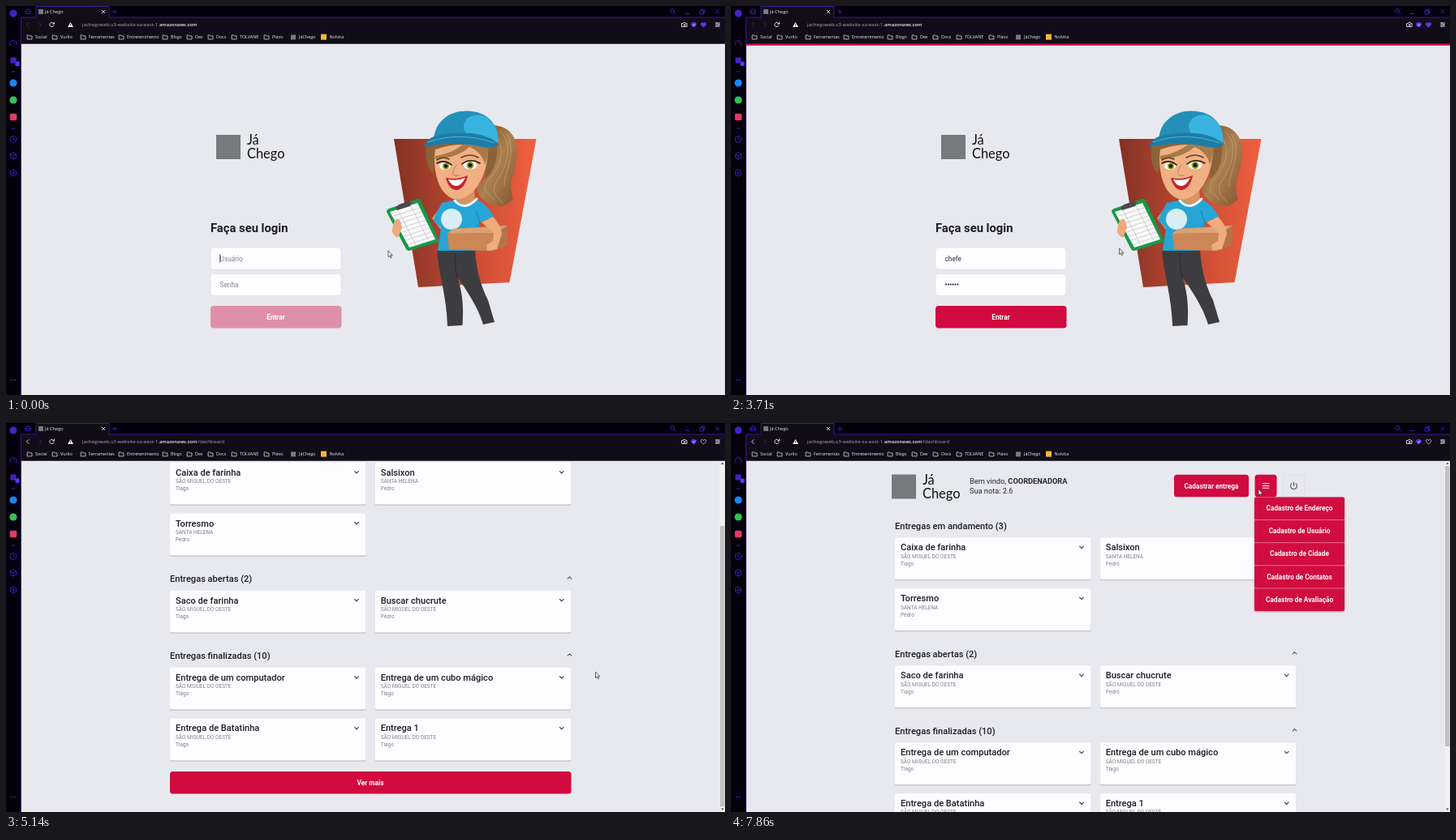
Recreate the animation shown at these times as an HTML page. Size 886 px wide and 480 px high, loop 8 s.

```html
<!DOCTYPE html>
<html lang="pt-BR">
<head>
<meta charset="utf-8">
<style>
html, body { margin: 0; width: 100%; height: 100%; overflow: hidden; background: #e8e9ee }
svg { display: block; width: 886px; height: 480px; font-family: Roboto, sans-serif }
.ui { font-family: "Open Sans", sans-serif; fill: #f2f0f8 }
.b { font-weight: 700 }
.m { font-weight: 500 }
.c { text-anchor: middle; fill: #fff; font-weight: 700; font-size: 8.3px }
.line { fill: none; stroke-linecap: round; stroke-linejoin: round }
</style>
</head>
<body>
<svg viewBox="0 0 886 480">
  <defs>
    <linearGradient id="red"><stop stop-color="#823224"/><stop offset=".55" stop-color="#c94b34"/><stop offset="1" stop-color="#f0603f"/></linearGradient>
    <linearGradient id="hair" x2="1" y2="1"><stop stop-color="#704a2b"/><stop offset=".5" stop-color="#ad8052"/><stop offset="1" stop-color="#80562f"/></linearGradient>
    <filter id="shade" x="-10%" y="-10%" width="120%" height="125%"><feDropShadow dx="0" dy="1" stdDeviation="1" flood-opacity=".35"/></filter>
    <g id="brand">
      <rect x="259" y="159" width="30" height="30" fill="#77797c"/>
      <g font-family="Lato, sans-serif" font-size="16.4" fill="#111"><text x="297" y="171">Já</text><text x="297" y="188">Chego</text></g>
    </g>
  </defs>
  <rect width="886" height="480" fill="#e8e9ee"/>

  <g id="login">
    <use href="#brand"/>
    <text x="252" y="279.2" class="b" font-size="14.77" fill="#1d1d24">Faça seu login</text>
    <g fill="#fdfdff" stroke="#dcdce6" stroke-width=".7">
      <rect x="252" y="298" width="161" height="27.3" rx="4"/>
      <rect x="252" y="330.3" width="161" height="27.3" rx="4"/>
    </g>
    <text id="user" x="263.5" y="314.6" font-size="8.3"/>
    <text id="pass" x="263.5" y="346.9" font-size="8.3"/>
    <g id="dots" fill="#222"></g>
    <rect id="caret" width=".8" height="10.5" fill="#222"/>
    <rect id="enter" x="252" y="370" width="161.5" height="27.5" rx="4"/>
    <text class="c" x="332.5" y="386.6">Entrar</text>

    <g id="courier">
      <path d="M478 164H653.5L620.5 341 508 347Z" fill="url(#red)"/>
      <path d="M600 147C623 148 633 166 629 190C627 210 618 217 625 238C620 241 619 247 608 247C594 245 579 237 580 221C594 214 602 190 597 172Z" fill="url(#hair)"/>
      <path class="line" stroke="#c99d6b" stroke-width=".8" d="M608 154C627 170 617 197 606 214S606 235 612 243M604 160C618 180 606 203 595 214S594 231 602 239M617 158C631 182 613 205 614 222"/>
      <path d="M518 172C516 186 519 200 526 207L532 180 592 178 590 214C604 202 607 184 604 164Z" fill="#8c6238"/>
      <path d="M556 228 577 222 578 243Q567 251 554 243Z" fill="#d99263"/>
      <path d="M529 177C526 196 530 222 543 233C552 241 562 240 572 232C585 222 594 201 594 174Q560 166 529 177Z" fill="#f0b083"/>
      <path d="M529 185C540 184 558 177 566 168L595 172Q594 186 590 196C588 184 579 177 571 174C560 184 544 188 529 189Z" fill="#a97a49"/>
      <g fill="#fff"><ellipse cx="541" cy="197.5" rx="7" ry="4.6"/><ellipse cx="572" cy="196.5" rx="8.5" ry="5"/></g>
      <g fill="#8b9e25"><circle cx="542" cy="197.5" r="4"/><circle cx="572" cy="196.5" r="4.4"/></g>
      <g fill="#151515"><circle cx="542" cy="197.5" r="2.2"/><circle cx="572" cy="196.5" r="2.4"/></g>
      <path class="line" stroke="#28190f" stroke-width="1.6" d="M531 194Q540 189 549 196M562 195Q572 187 584 194"/>
      <path class="line" stroke="#65401f" stroke-width="1.6" d="M531 190Q538 185 546 189M561 187Q572 181 582 187"/>
      <path class="line" stroke="#c77d50" d="M555 196Q548 207 552 209L558 209"/>
      <path d="M542 212Q556 215 569 209C567 220 561 227 555 227C549 227 544 221 542 212Z" fill="#c5232f"/>
      <path d="M545 214Q557 216 566 212Q560 223 554 222Q548 221 545 214Z" fill="#fff"/>
      <path d="M527 166C528 142 547 129 568 129.500C594 130 608 146 606 170Q566 153 527 166Z" fill="#2390b9"/>
      <path d="M564 151C563 138 575 133 587 135C602 141 608 154 606 169Q586 161 568 160Z" fill="#38b3df"/>
      <path d="M516 174C517 163 530 158 550 157C578 155 599 161 607 171Q600 176 588 174Q552 166 516 174Z" fill="#1d7da6"/>
      <path class="line" stroke="#62bfdd" stroke-width=".8" d="M520 168Q559 154 602 169"/>
      <path d="M538 245 525 262 536 276 546 262Z" fill="#eaa473"/>
      <path d="M537 243 555 239Q566 251 578 238C590 243 596 250 601 260L584 267 578 302H532L536 274 526 264Z" fill="#26a6d6"/>
      <path class="line" stroke="#f6f8fa" stroke-width="3" d="M553 240Q565 254 580 238"/>
      <path class="line" stroke="#197da7" d="M579 253 584 267 578 275"/>
      <circle cx="549" cy="263" r="13" fill="#d9edf4"/>
      <path d="M531 302H578C580 329 586 347 594 363L602 390 588 393C581 370 567 350 556 334C563 354 564 374 562.500 394L544 395C543 358 533 329 531 302Z" fill="#3d3d3f"/>
      <path class="line" stroke="#2a2a2c" d="M554 305Q552 324 557 337"/>
      <path d="M544 281 551 275 618 271V295L599 303 546 300Z" fill="#b67349"/>
      <path d="M544 281 551 275 618 271 603 280Z" fill="#dda273"/>
      <path d="M544 281 603 280 600 302 546 300Z" fill="#cc8757"/>
      <path d="M586 267 600 260C607 267 611 275 611 281L605 300 593 302 592 295 600 290 601 280Z" fill="#efac7c"/>
      <path d="M469 254Q469 251 472 250L507 238Q510 237 511 240L533 288Q534 291 531 292L497 302Q494 302 493 300Z" fill="#199848"/>
      <path d="M473 254 507 243 529 288 497 298Z" fill="#fafafa"/>
      <path class="line" stroke="#b9bcc0" stroke-width=".7" d="M478 259 509 249M481 264 512 254M483 269 514 259M486 274 517 264M488 279 519 269M491 284 522 274M493 289 524 279M496 294 527 284M483 252 505 295M499 247 521 290"/>
      <path d="M480 249 484 245 496 241 500 243 498 247 482 252Z" fill="#4a4a4d"/>
      <path d="M478 267Q482 260 486 265L488 274 483 286Q475 283 476 275Z" fill="#eeaa7c"/>
    </g>
    <rect id="bar" x="19" y="46.500" width="867" height="2.300" fill="#d20a42"/>
  </g>

  <g id="dash">
    <g id="page"></g>
    <rect x="879.5" y="46" width="6.500" height="434" fill="#f1f1f3"/>
    <rect id="thumb" x="880" width="5.500" height="346" fill="#c1c1c3"/>
    <path d="M881 51 882.800 48.500 884.600 51ZM881 475.500 882.800 478 884.600 475.500Z" fill="#555"/>
    <g id="menu" filter="url(#shade)"></g>
  </g>

  <g id="chrome">
    <path d="M0 0H886V46.500H18.500V480H0Z" fill="#04000b"/>
    <path d="M19 14H886V46.500H19Z" fill="#110d18"/>
    <path d="M37 14V0H127V14Z" fill="#110d18"/>
    <path class="line" stroke="#3c1c9c" stroke-width=".9" d="M18.500 480V14H37V.5H127V14H886"/>
    <g id="marks"></g>
    <g class="line" stroke="#4422c4" stroke-width=".9">
      <path d="M24 9V6L25.500 4H28.500L30 6V9ZM24 7H30M131.500 7H136.500M134 4.500V9.500M837 9.500H842M855.500 6H859.500V10H855.500ZM857 6V4.300H861V8.500H859.500M874.500 4.500 879 9M879 4.500 874.500 9M823 7.500 825 9.500"/>
      <circle cx="821" cy="5.800" r="2.300"/>
      <path d="M6 49A4 4 0 1 1 12 49M9 46 11 44M7 81H11M7 151H11"/>
      <circle cx="9" cy="164.500" r="4"/><path d="M9 162V164.500L11 166"/>
      <path d="M9 181 12.700 183V187L9 189 5.300 187V183ZM5.300 183 9 185 12.700 183M9 185V189"/>
      <circle cx="9" cy="206" r="1.400"/><path d="M9 202 12.500 204V208L9 210 5.500 208V204Z"/>
    </g>
    <g fill="#5730e8"><circle cx="6.500" cy="461.500" r=".7"/><circle cx="9" cy="461.500" r=".7"/><circle cx="11.500" cy="461.500" r=".7"/></g>
    <circle cx="9" cy="9" r="4.500" fill="#4422c4"/>
    <rect x="5.500" y="63.500" width="7" height="7" fill="#4422c4"/>
    <rect x="11.500" y="68.500" width="5" height="5.500" rx="1" fill="#5a35f0"/>
    <circle cx="9" cy="95" r="4.600" fill="#1687f5"/>
    <circle cx="9" cy="116" r="4.600" fill="#2cc55c"/>
    <rect x="4.700" y="132.700" width="8.600" height="8.600" rx="2" fill="#e23a64"/>
    <rect x="40" y="4" width="6" height="6" fill="#77797c"/>
    <text class="ui" x="48" y="9.300" font-size="5.600">Já Chego</text>
    <g class="line" stroke="#e8e5f0" stroke-width=".9">
      <path d="M118.300 5.300 121.700 8.700M121.700 5.300 118.300 8.700"/>
      <path id="back" d="M28 20.500 25.500 23 28 25.500"/>
      <path stroke="#3e3948" d="M41 20.500 43.500 23 41 25.500"/>
      <path d="M59 22A2.700 2.700 0 1 0 59 24M59.500 20V22H57.500"/>
      <path d="M833 21.500H834.500L835 20.500H837L837.500 21.500H839V25.500H833Z"/><circle cx="836" cy="23.500" r=".9"/>
      <path d="M874.500 21H879.500M874.500 23H879.500M874.500 25H879.500M876 20.500V21.500M878 22.500V23.500M876 24.500V25.500"/>
    </g>
    <path d="M79.500 20 83 26H76Z" fill="#f4f2f8"/><path d="M79.500 22V24M79.500 24.800V25.300" stroke="#110d18" stroke-width=".7"/>
    <path d="M847.500 19.800 850.700 21V23.500Q850 25.500 847.500 26.500Q845 25.500 844.300 23.500V21Z" fill="#5c35f2"/>
    <path d="M846 23 847.200 24.200 849.200 22" fill="none" stroke="#fff" stroke-width=".7"/>
    <path id="heart" stroke-width=".8" d="M859.500 26C855 23 856 20.500 857.800 20.500Q859 20.500 859.500 21.700Q860 20.500 861.200 20.500C863 20.500 864 23 859.500 26Z"/>
    <g class="ui" font-size="6.100">
      <text x="188.800" y="25.200" text-anchor="end" style="fill:#aaa6b4">jachegoweb.s3-website-sa-east-1.</text>
      <text x="189" y="25.200" font-size="5.750" font-weight="600">amazonaws.com</text>
      <text id="path" x="236" y="25.200" style="fill:#aaa6b4">/dashboard</text>
    </g>
  </g>
  <path id="cursor" d="M0 0V7.600L1.700 6.100 2.900 8.700 4 8.200 2.900 5.700H5.200Z" fill="#fff" stroke="#222" stroke-width=".7"/>
</svg>
<script>
const $ = id => document.getElementById(id);
const RED = '#d10a40';
const text = (x, y, size, s, attrs = '') => `<text x="${x}" y="${y}" font-size="${size}" ${attrs}>${s}</text>`;
const button = (x, y, w, h = 27.5) => `<rect x="${x}" y="${y}" width="${w}" height="${h}" rx="3.5" fill="${RED}"/>`;
const label = (x, y, s) => `<text class="c" x="${x}" y="${y}">${s}</text>`;
const chevron = (x, y, d, color) =>
  `<path class="line" stroke="${color}" stroke-width="1.1" d="M${x - 2.3} ${y - d}L${x} ${y + d} ${x + 2.3} ${y - d}"/>`;
const show = (id, on) => $(id).style.display = on ? '' : 'none';

// Bookmarks
const folders = [[26, 'Social'], [57, 'Vurlio'], [92, 'Ferramentas'], [139, 'Entretenimento'], [193, 'Blogs'],
  [223, 'Dev'], [249, 'Docs'], [278, 'TOLVANE'], [318, 'Plavo']];
const bookmark = (x, s) => text(x, 40.2, 5.4, s, 'class="ui"');
$('marks').innerHTML = folders.map(([x, s]) =>
  `<path class="line" stroke="#d6d3de" stroke-width=".8" d="M${x + .5} 36H${x + 2.5}L${x + 3.3} 37H${x + 6}V41H${x + .5}Z"/>` +
  bookmark(x + 10, s)).join('') +
  '<rect x="351" y="35.5" width="6" height="6" fill="#77797c"/>' + bookmark(361, 'JáChego') +
  '<rect x="388" y="34.700" width="7" height="7" fill="#f5b92c"/>' + bookmark(398.5, 'Nolvita');

// Dashboard
const MIGUEL = 'SÃO MIGUEL DO OESTE', HELENA = 'SANTA HELENA';
const heading = (y, s) => text(202, y, 11.08, s, 'class="m" fill="#1d1d22"') + chevron(694.5, y - 5.3, -1.1, '#555');
const card = (col, y, title, city, name) => {
  const x = col ? 454.7 : 202;
  return `<rect x="${x}" y="${y + .8}" width="241.6" height="52" rx="2" fill="#b4b4bb"/>
    <rect x="${x}" y="${y}" width="241.6" height="51.800" rx="2" fill="#fdfdff"/>` +
    text(x + 7, y + 15.9, 11.08, title, 'class="m" fill="#1d1d22"') +
    text(x + 7, y + 25.1, 6.46, city, 'fill="#838388"') +
    text(x + 7, y + 34.4, 6.46, name, 'fill="#838388"') +
    chevron(x + 230, y + 12, 1.2, '#34385f');
};
$('page').innerHTML = '<use href="#brand" x="-61" y="-95.500"/>' +
  text(294, 75.4, 9.23, 'Bem vindo, <tspan class="b">COORDENADORA</tspan>', 'fill="#25252a"') +
  text(294, 86.5, 9.23, 'Sua nota: 2.6', 'fill="#25252a"') +
  button(546, 63.8, 92) + label(592, 80.5, 'Cadastrar entrega') + button(645.5, 63.8, 27) +
  `<path stroke="#fff" stroke-width="1.100" d="M654.700 74.700H663.300M654.700 77.500H663.300M654.700 80.300H663.300"/>
  <rect x="680" y="64" width="27" height="27" rx="3.500" fill="none" stroke="#dcdde3" stroke-width=".8"/>
  <path class="line" stroke="#55555c" stroke-width="1.100" d="M693.500 73.200V77.500M690.900 74.600A4 4 0 1 0 696.100 74.600"/>` +
  heading(131, 'Entregas em andamento (3)') +
  card(0, 141.5, 'Caixa de farinha', MIGUEL, 'Tiago') +
  card(1, 141.5, 'Salsixon', HELENA, 'Pedro') +
  card(0, 204.4, 'Torresmo', HELENA, 'Pedro') +
  heading(289, 'Entregas abertas (2)') +
  card(0, 299.4, 'Saco de farinha', MIGUEL, 'Tiago') +
  card(1, 299.4, 'Buscar chucrute', MIGUEL, 'Pedro') +
  heading(384, 'Entregas finalizadas (10)') +
  card(0, 394.5, 'Entrega de um computador', MIGUEL, 'Tiago') +
  card(1, 394.5, 'Entrega de um cubo mágico', MIGUEL, 'Tiago') +
  card(0, 457.3, 'Entrega de Batatinha', MIGUEL, 'Tiago') +
  card(1, 457.3, 'Entrega 1', MIGUEL, 'Tiago') +
  button(202, 522.8, 494.5) + label(449, 539.5, 'Ver mais');

$('menu').innerHTML = `<rect x="645" y="91.500" width="111" height="140.500" rx="2" fill="${RED}"/>` +
  ['Endereço', 'Usuário', 'Cidade', 'Contatos', 'Avaliação'].map((s, i) => {
    const y = 91.5 + i * 28.1;
    return (i ? `<path stroke="#f6c5d2" stroke-width=".8" stroke-dasharray="1.5 .7" d="M645 ${y}H756"/>` : '') +
      label(700.5, y + 16.7, 'Cadastro de ' + s);
  }).join('');

for (let i = 0; i < 6; i++)
  $('dots').innerHTML += `<circle cx="${265 + i * 2.85}" cy="343.500" r="1.050"/>`;

// Keys are [step, values...], linear in between
const track = (keys, n) => {
  const i = keys.findIndex(k => k[0] > n);
  if (i < 0) return keys.at(-1).slice(1);
  const a = keys[i - 1], b = keys[i], u = (n - a[0]) / (b[0] - a[0]);
  return a.slice(1).map((v, j) => v + (b[j + 1] - v) * u);
};
const mouse = [[0, 471, 302], [22, 471, 302], [25, 477.5, 298], [31, 484, 303.5], [33, 590, 310], [35, 720, 308],
  [36, 726.5, 307], [39, 718.5, 313], [41, 708, 260], [45, 664, 86], [46, 659, 79], [47, 657, 80],
  [49, 654, 83], [51, 654, 83], [53, 651.5, 84], [54, 651.5, 84], [55, 650, 81.5]];
const wheel = [[0, 0], [32, 0], [33, 28], [34, 72], [35, 92.7], [37, 92.7], [38, 42], [39, 3.4], [40, 0]];

function field(id, value, hint) {
  $(id).textContent = value || hint;
  $(id).setAttribute('fill', value ? '#33333a' : '#85858c');
}

function draw(n) {
  const dash = n >= 31;
  show('login', !dash);
  show('dash', dash);
  show('path', dash);
  $('back').setAttribute('stroke', dash ? '#e8e5f0' : '#3e3948');
  $('heart').setAttribute('fill', dash ? 'none' : '#5c35f2');
  $('heart').setAttribute('stroke', dash ? '#d6d3de' : '#5c35f2');

  const typed = Math.max(0, Math.min(5, n - 5));
  const secret = n < 17 ? 0 : [1, 2, 3, 5, 6][Math.min(4, n - 17)];
  field('user', 'chefe'.slice(0, typed), 'Usuário');
  field('pass', '', secret ? '' : 'Senha');
  [...$('dots').children].forEach((d, i) => d.style.display = i < secret ? '' : 'none');
  $('enter').setAttribute('fill', secret ? RED : '#de90a9');
  show('bar', n >= 23);

  const onPass = n >= 12;
  const width = onPass ? secret * 2.85 : typed && $('user').getComputedTextLength();
  $('caret').setAttribute('x', 263.4 + width);
  $('caret').setAttribute('y', onPass ? 338.5 : 306.2);
  show('caret', n < 2 || n >= 6 && n < 15 || n >= 17 && n < 23);

  const [scroll] = track(wheel, n);
  $('page').setAttribute('transform', `translate(0 ${-scroll})`);
  $('thumb').setAttribute('y', 53 + scroll * .8);
  show('menu', n >= 47);
  $('cursor').setAttribute('transform', `translate(${track(mouse, n)})`);
}

// The screen refreshes seven times a second
let last = -1;
function tick() {
  const n = Math.floor(performance.now() % 8000 * .007 + .05) % 56;
  if (n !== last) draw(last = n);
  requestAnimationFrame(tick);
}
tick();
</script>
</body>
</html>
```
